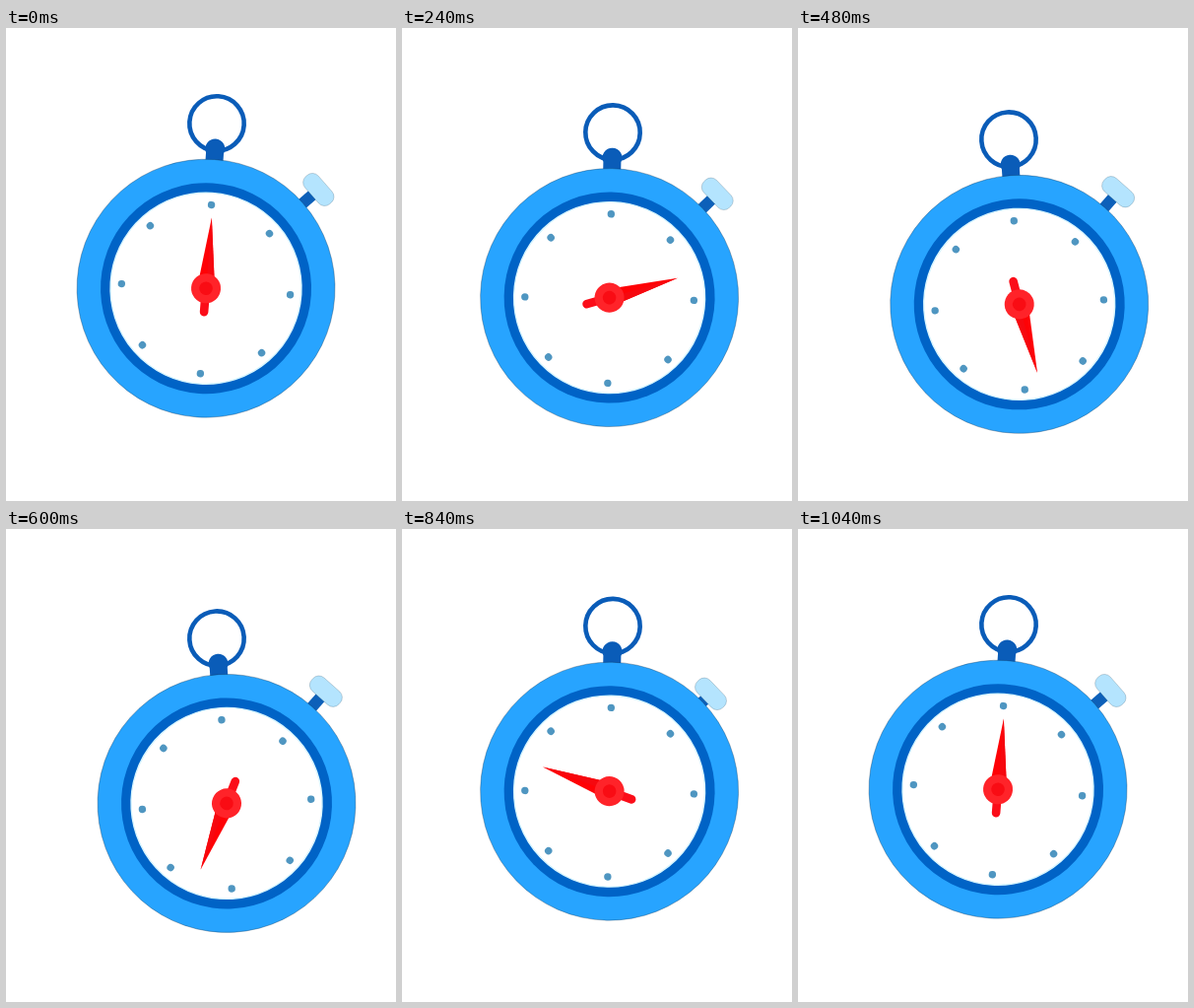
These frames come from a looping animation (396x480 px, 1.08 s). An HTML page:

```html
<!DOCTYPE html>
<html lang="en">
<head>
<meta charset="utf-8">
<title>Stopwatch</title>
<style>
  html, body { margin: 0; width: 100%; height: 100%; overflow: hidden; background: #fff; }
  svg { display: block; width: 100vw; height: 100vh; }
</style>
</head>
<body>
<svg viewBox="0 0 396 480">
  <!-- Origin: centre of the hanging ring -->
  <g id="watch">
    <circle r="27.7" fill="none" stroke="#0a5cb8" stroke-width="4.6"/>
    <path d="M-9 42V30A10 10 0 1 1 9 30V42Z" fill="#0a5cb8"/>
    <g transform="translate(0 167.6)">
      <g id="button">
        <rect x="-5.8" y="-148" width="11.6" height="24" fill="#0d60b9"/>
        <rect x="-18.5" y="-161" width="37" height="18" rx="8" fill="#b4e4fe" stroke="#12344d" stroke-opacity=".4" stroke-width=".5"/>
      </g>
      <circle r="131" fill="#27a4ff" stroke="#0d2c47" stroke-opacity=".55" stroke-width=".6"/>
      <circle r="107" fill="#0063c6"/>
      <circle r="97" fill="#fff" stroke="#d9f6ff" stroke-width="1.4"/>
      <g id="dots" transform="translate(0 1)" fill="#4f96c1"></g>
      <g id="needle">
        <path d="M0 0V24" stroke="#fb0d19" stroke-width="8.6" stroke-linecap="round"/>
        <path d="M0-72L-9 0H9Z" fill="#fe0206"/>
        <path d="M0-72L9 0H0Z" fill="#f6080f"/>
        <circle r="15" fill="#ff2329"/>
        <circle r="6.8" fill="#f90c14"/>
      </g>
    </g>
  </g>
</svg>
<script>
const byId = id => document.getElementById(id);
const watch = byId('watch'), button = byId('button'), needle = byId('needle');
const LOOP = 1080, STEP = 40, CYCLE = 30;

byId('dots').innerHTML = Array.from({ length: 8 }, (_, i) =>
  `<circle r="3.7" cy="-85.8" transform="rotate(${i * 45})"/>`).join('');

const easeInOut = p => p < .5 ? (2 * p) ** 2.2 / 2 : 1 - (2 - 2 * p) ** 2.2 / 2;

const press = (tick, centre) => {
  const d = Math.abs(tick - centre) / 3;
  return d < 1 ? 10 * Math.cos(d * Math.PI / 2) ** 2 : 0;
};

// Motion runs at 30 ticks per turn, shown in 40 ms steps.
function tickAt(time) {
  const step = Math.floor(time % LOOP / STEP);
  return Math.max(Math.min(step, 1), Math.ceil((step - 1) * 6 / 5));
}

function draw(time) {
  const tick = tickAt(time);
  const swing = 3.75 * Math.cos(2 * Math.PI * tick / CYCLE);
  const phase = (tick + 2) % CYCLE / (CYCLE / 2);
  const drop = 16.7 * easeInOut(phase < 1 ? phase : 2 - phase);
  const pushed = press(tick, 10.5) + press(tick, 24.5);

  watch.setAttribute('transform', `translate(214 ${96.5 + drop}) rotate(${swing})`);
  button.setAttribute('transform', `rotate(45) translate(0 ${pushed})`);
  needle.setAttribute('transform', `rotate(${12 * tick + .9})`);
}

const start = performance.now();
function loop() {
  draw(performance.now() - start);
  requestAnimationFrame(loop);
}
loop();
</script>
</body>
</html>
```
